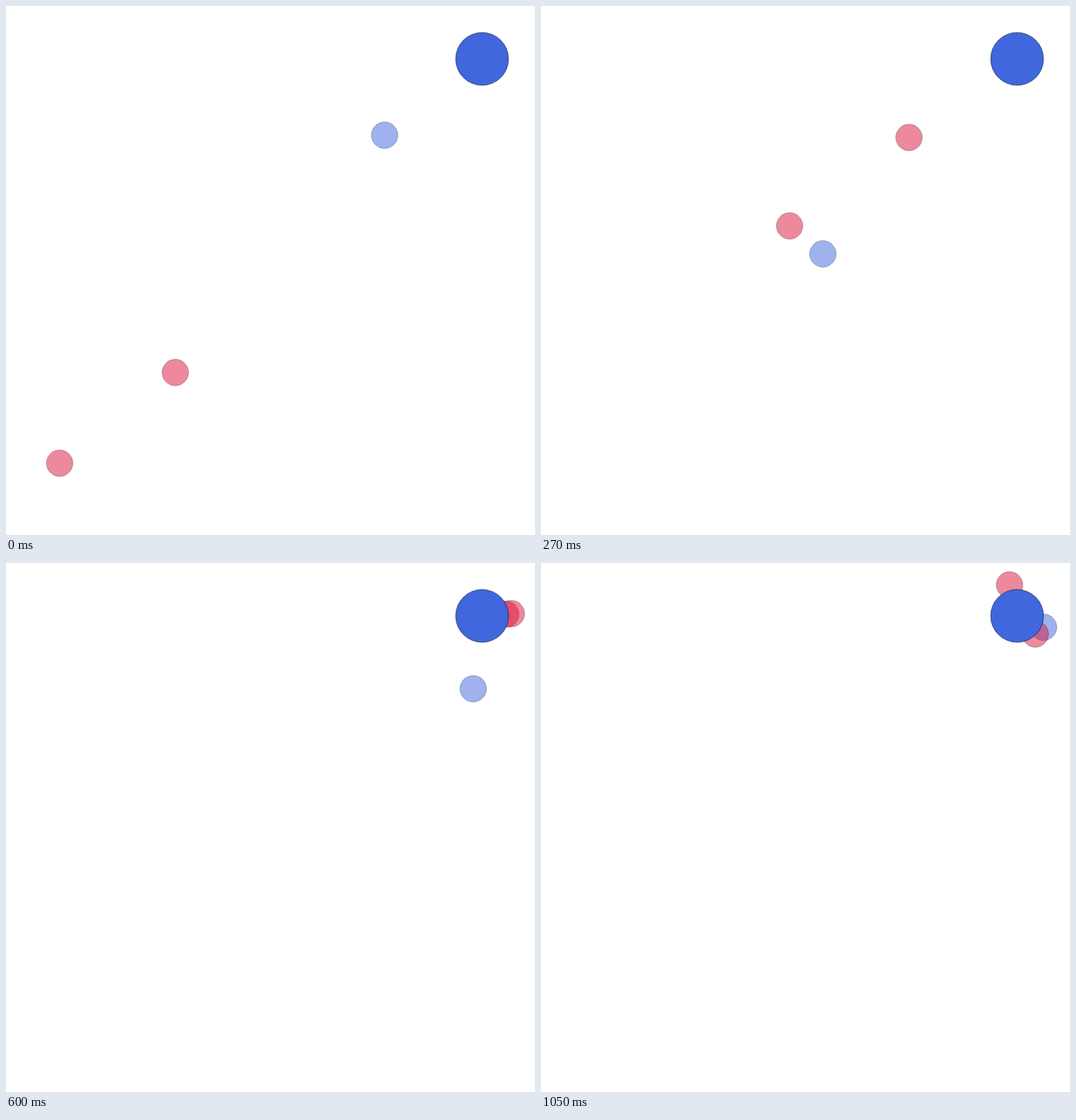
Animation of 700 by 700 pixels, one loop 1080 ms. Source, as an HTML page with a canvas:

```html
<!DOCTYPE html>
<html>
<head>
<meta charset="utf-8">
<style>
  html, body { margin: 0; width: 100%; height: 100%; overflow: hidden; background: #fff; }
  canvas { display: block; }
</style>
</head>
<body>
<canvas id="stage" width="700" height="700"></canvas>
<script>
const ctx = document.getElementById('stage').getContext('2d');
const STEP = 30, STEPS = 36;
const RED = 'rgb(220,20,60)', BLUE = 'rgb(64,103,221)';
const HUB = { x: 630, y: 70, r: 35 };

// Steps at which every mover passes its next key point.
const keys = [0, 5, 9, 17, 24, 29, 35];
const last = keys.length - 1;

// Key points as offsets from the hub; later movers are painted on top.
const movers = [
  { color: BLUE,
    x: [-129, -241, -257, -58, 27, 41, 35],
    y: [101, 236, 258, 149, 34, 5, 15] },
  { color: RED,
    x: [-559, -432, -301, -11, 44, 16, 24],
    y: [535, 347, 221, 7, 7, -29, 24] },
  { color: RED,
    x: [-406, -268, -143, 30, 24, 8, -10],
    y: [415, 234, 104, 29, -35, -29, -41] }
];

const span = i => keys[i + 1] - keys[i];
const rate = (p, i) => (p[i + 1] - p[i]) / span(i);

// Tangent of the parabola through a key point and its neighbours.
function slope(p, i) {
  if (i === 0) return 1.5 * rate(p, 0) - 0.5 * slope(p, 1);
  if (i === last) return 1.5 * rate(p, last - 1) - 0.5 * slope(p, last - 1);
  const before = span(i - 1), after = span(i);
  return (rate(p, i - 1) * after + rate(p, i) * before) / (before + after);
}

// Smooth cubic through the key points.
function glide(p, t) {
  let i = 0;
  while (i < last - 1 && t >= keys[i + 1]) i++;
  const h = span(i), u = (t - keys[i]) / h, v = 1 - u;
  return p[i] * v * v * (1 + 2 * u) + p[i + 1] * u * u * (1 + 2 * v)
    + h * u * v * (slope(p, i) * v - slope(p, i + 1) * u);
}

function disc(x, y, r, color, alpha) {
  ctx.globalAlpha = alpha;
  ctx.beginPath();
  ctx.arc(x, y, r, 0, 2 * Math.PI);
  ctx.fillStyle = color;
  ctx.fill();
  ctx.lineWidth = 0.5;
  ctx.stroke();
}

const start = performance.now();

function draw() {
  const step = Math.floor((performance.now() - start) / STEP) % STEPS;
  ctx.clearRect(0, 0, 700, 700);
  for (const { color, x, y } of movers) {
    disc(HUB.x + glide(x, step), HUB.y + glide(y, step), HUB.r / 2, color, 0.5);
  }
  disc(HUB.x, HUB.y, HUB.r, BLUE, 1);
  requestAnimationFrame(draw);
}
draw();
</script>
</body>
</html>
```
